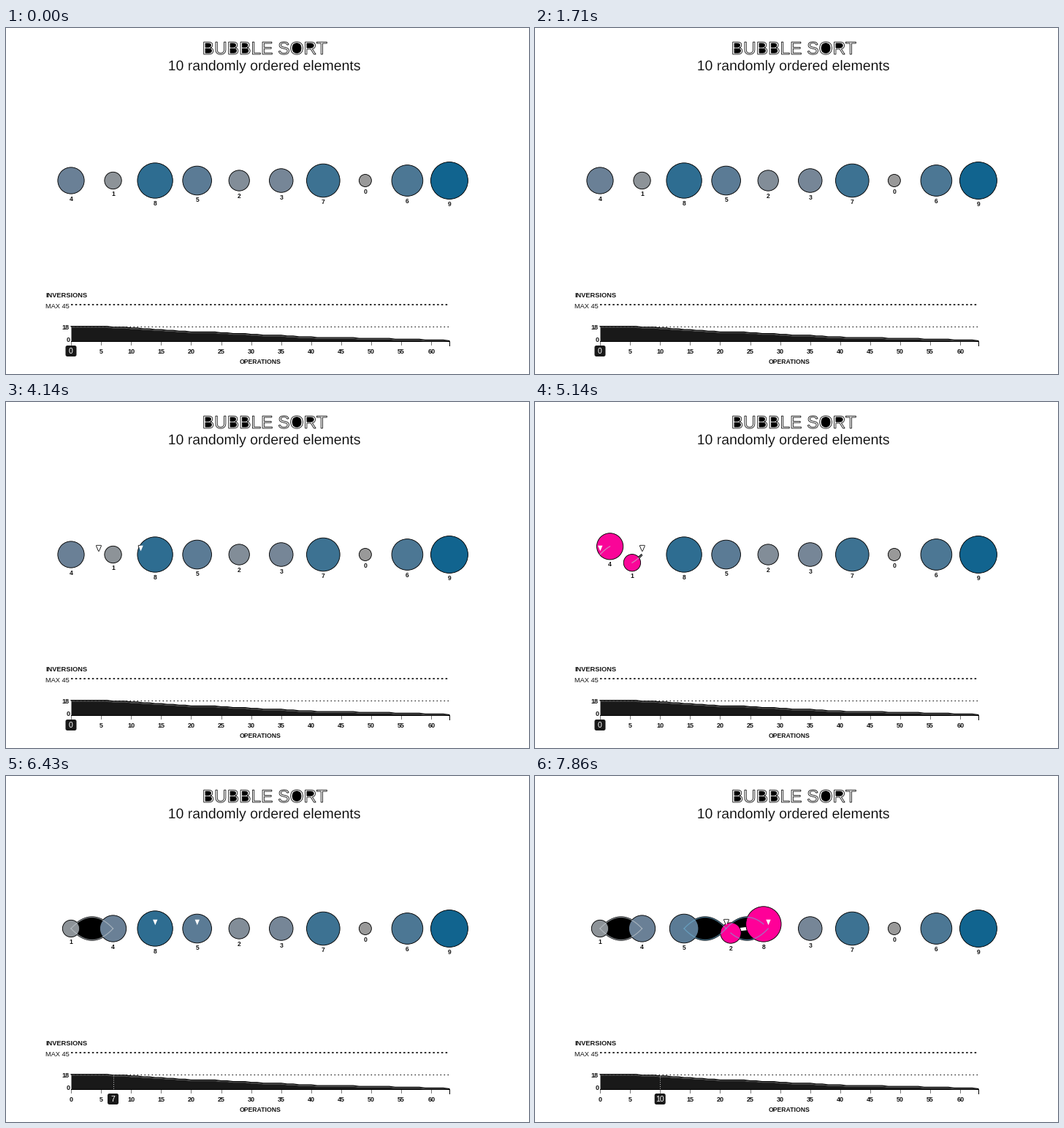
A matplotlib script that plays this animation: 716 by 474 pixels, repeating every 8000 ms.

```python
import numpy as np
import matplotlib.pyplot as plt
from matplotlib.animation import FuncAnimation
from matplotlib.patches import Circle, FancyBboxPatch, PathPatch, Polygon
from matplotlib.textpath import TextPath
from matplotlib.transforms import Affine2D

W, H, DPI = 716, 474, 64
PX = 72 / DPI  # points per pixel
LOOP, POSES, SUBFRAMES = 8000, 56, 3
FRAMES = POSES * SUBFRAMES
FONT = "Liberation Sans"
VALUES = [4, 1, 8, 5, 2, 3, 7, 0, 6, 9]
X0, GAP, MID = 89, 57.55, 209
OP_WIDTH, BASE, INV_HEIGHT, MAX_OPS = 8.22, 428.5, 1.1, 63
MOVE, LEAD_OPS = 500, 5
PINK = np.array([255, 0, 152]) / 255
INK = "#191919"

# (start, slot, operation shown once the swap is done)
SWAPS = [(4948, 0, 7), (6484, 2, 10), (7508, 3, 12)]
# (start, duration, from slot, to slot)
MARKER_MOVES = [(2100, 1050, -0.45, 2), (3560, 1030, 2, 0),
                (5460, MOVE, 0, 1), (5972, MOVE, 1, 2), (6996, MOVE, 2, 3)]


def ease(u):
    u = min(max(u, 0), 1)
    return 4 * u**3 if u < 0.5 else 1 - 4 * (1 - u)**3


def radius(value):
    return np.sqrt(72 + 64 * value)


def shade(value):
    stops = [0, 4, 8, 9]
    channels = [(153, 106, 46, 17), (153, 128, 109, 100), (153, 150, 145, 143)]
    return np.array([np.interp(value, stops, c) for c in channels]) / 255


def op_x(op):
    return X0 + op * OP_WIDTH


def inversion_curve():
    """Inversions left after every operation of a full bubble sort."""
    row = list(VALUES)
    left = sum(a > b for i, a in enumerate(row) for b in row[i + 1:])
    curve = [left] * (LEAD_OPS + 1)
    for end in range(len(row) - 1, 0, -1):
        for j in range(end):
            curve.append(left)
            if row[j] > row[j + 1]:
                row[j], row[j + 1] = row[j + 1], row[j]
                left -= 1
                curve.append(left)
    return np.array(curve[:MAX_OPS + 1])


fig = plt.figure(figsize=(W / DPI, H / DPI), dpi=DPI, facecolor="white")
ax = fig.add_axes([0, 0, 1, 1])
ax.set(xlim=(0, W), ylim=(H, 0))
ax.axis("off")


def label(x, y, text, size, **kw):
    style = dict(ha="center", va="center_baseline", color="#111111",
                 family=FONT, weight="bold", zorder=6)
    return ax.text(x, y, text, fontsize=size * PX, **{**style, **kw})


def line(xs, ys, width=1.0, **kw):
    return ax.plot(xs, ys, lw=width * PX, **{"color": "black", **kw})[0]


def heading(text, size, cx, baseline, fill, edge, width, fill_counters=False):
    path = TextPath((0, 0), text, size=size, prop={"family": FONT})
    box = path.get_extents()
    place = Affine2D().scale(1, -1).translate(cx - (box.x0 + box.x1) / 2, baseline)
    ax.add_patch(PathPatch(place.transform_path(path), fc=fill, ec=edge,
                           lw=width * PX))
    if not fill_counters:
        return
    for poly in path.to_polygons():
        x, y = poly.T
        if np.sum(x[:-1] * y[1:] - x[1:] * y[:-1]) > 0:
            ax.add_patch(Polygon(place.transform(poly), fc="black", lw=0))


def draw_chart():
    curve = inversion_curve()
    xs = op_x(np.arange(MAX_OPS + 1))
    ys = BASE - curve * INV_HEIGHT
    right = xs[-1]
    ax.fill_between(xs, ys, BASE, color=INK, lw=0, zorder=2)
    line(xs, ys, 1.2, zorder=3)
    line(xs, ys + 1.3, 0.5, color="#8a8a8a", zorder=3)
    line([X0, right, right], [BASE + 0.5, BASE + 0.5, 434.5], zorder=3)
    line([X0, right], [379, 379], 1.6, dashes=(1.6, 2))
    line([X0, right], [409, 409], 1.0, dashes=(1.6, 3.4))
    label(54, 365.5, "INVERSIONS", 9.3, ha="left")
    label(87, 380, "MAX 45", 9.3, ha="right", weight="normal")
    label(87, 409.5, "18", 9, ha="right")
    label(88, 426, "0", 9, ha="right")
    label(348, 456.5, "OPERATIONS", 8.6)
    ticks = {}
    for op in range(0, MAX_OPS, 5):
        line([op_x(op)] * 2, [BASE, 434], 0.8, color="#555555")
        ticks[op] = label(op_x(op), 442.5, str(op), 9)
    return ticks


heading("BUBBLE SORT", 24.5, 355, 36, "white", "black", 0.8, fill_counters=True)
heading("10 randomly ordered elements", 19.45, 354, 58, "black", "white", 0.2)
tick_labels = draw_chart()

badge = FancyBboxPatch((0, 0), 11, 11, fc=INK, lw=0, zorder=7,
                       boxstyle="round,pad=2,rounding_size=2.5")
ax.add_patch(badge)
badge_text = label(0, 442.5, "0", 10.5, color="white", weight="normal", zorder=8)
cursor = line([0, 0], [410, 430], 0.9, color="#cccccc", dashes=(1.2, 2), zorder=4)

bubbles, names = [], []
for value in VALUES:
    bubble = Circle((0, MID), radius(value), ec="black", lw=0.9 * PX)
    bubbles.append(ax.add_patch(bubble))
    names.append(label(0, 0, str(value), 8.5))

lenses, trails = [], []
for n in range(len(SWAPS) * 2):
    lens = Polygon([(0, 0)] * 3, fc="black", ec="black", lw=2.4 * PX, zorder=1)
    lenses.append(ax.add_patch(lens))
    tint = "#c3cad0" if n < 2 else "#6fb2d6"
    trails.append(line([], [], 1.2, color=tint, alpha=0.65, zorder=5))


def triangle(**kw):
    return ax.add_patch(Polygon([(0, 0)] * 3, fc="white", **kw))


# The outline lies below the bubbles, the white face above them.
pointers = [(triangle(ec="black", lw=1.6 * PX, zorder=2), triangle(lw=0, zorder=7))
            for _ in range(2)]


def arc(slot, progress, upper):
    """Point on the path of the upper or lower bubble of a swapping pair."""
    lift = 62 * progress * (1 - progress)
    along = progress if upper else 1 - progress
    return X0 + (slot + along) * GAP, MID - lift if upper else MID + lift


def draw_swaps(t):
    order = list(range(len(VALUES)))
    places = [(X0 + i * GAP, MID) for i in order]
    glow = np.zeros(len(VALUES))
    for n, (start, slot, _) in enumerate(SWAPS):
        active = t >= start
        done = ease((t - start) / MOVE)
        steps = np.linspace(0, done, 30)
        for k, upper in enumerate((True, False)):
            xs, ys = arc(slot, steps, upper)
            lenses[2 * n + k].set_xy(np.column_stack([xs, ys]))
            lenses[2 * n + k].set_visible(active)
            trails[2 * n + k].set_data(xs, ys)
            trails[2 * n + k].set_visible(active)
            if active:
                who = order[slot + k]
                places[who] = arc(slot, done, upper)
                rise = ease((t - start) / 250)
                fall = ease((t - start - MOVE - 12) / 265)
                glow[who] = max(glow[who], rise * (1 - fall))
        if active:
            order[slot], order[slot + 1] = order[slot + 1], order[slot]
    for i, value in enumerate(VALUES):
        x, y = places[i]
        bubbles[i].center = x, y
        bubbles[i].set_facecolor(shade(value) * (1 - glow[i]) + PINK * glow[i])
        bubbles[i].set_zorder(4 if glow[i] and value == 8 else 3)
        names[i].set_position((x, y + radius(value) + 6))


def draw_pointers(t):
    slot = None
    for start, duration, a, b in MARKER_MOVES:
        if t >= start:
            slot = a + (b - a) * ease((t - start) / duration)
    for k, pair in enumerate(pointers):
        for part in pair:
            part.set_visible(slot is not None)
            if slot is not None:
                x = X0 + 0.3 + (slot + k) * GAP
                part.set_xy([(x - 3.2, 196.7), (x + 3.2, 196.7), (x, 204.3)])


def draw_badge(t):
    op = max([o for start, _, o in SWAPS if t >= start + MOVE], default=0)
    x = op_x(op)
    badge.set_x(x - 5.5)
    badge.set_y(437)
    badge_text.set_text(str(op))
    badge_text.set_x(x)
    cursor.set_xdata([x, x])
    cursor.set_visible(op > 0)
    for tick, text in tick_labels.items():
        text.set_visible(tick != op)


def update(frame):
    # Poses are held; each one begins a subframe ahead of its nominal time.
    pose = min((frame + 1) // SUBFRAMES, POSES - 1)
    t = pose * LOOP / POSES
    draw_swaps(t)
    draw_pointers(t)
    draw_badge(t)
    return []


anim = FuncAnimation(fig, update, frames=FRAMES, interval=LOOP / FRAMES,
                     init_func=lambda: update(0), repeat=True, repeat_delay=0)
plt.show()
```
